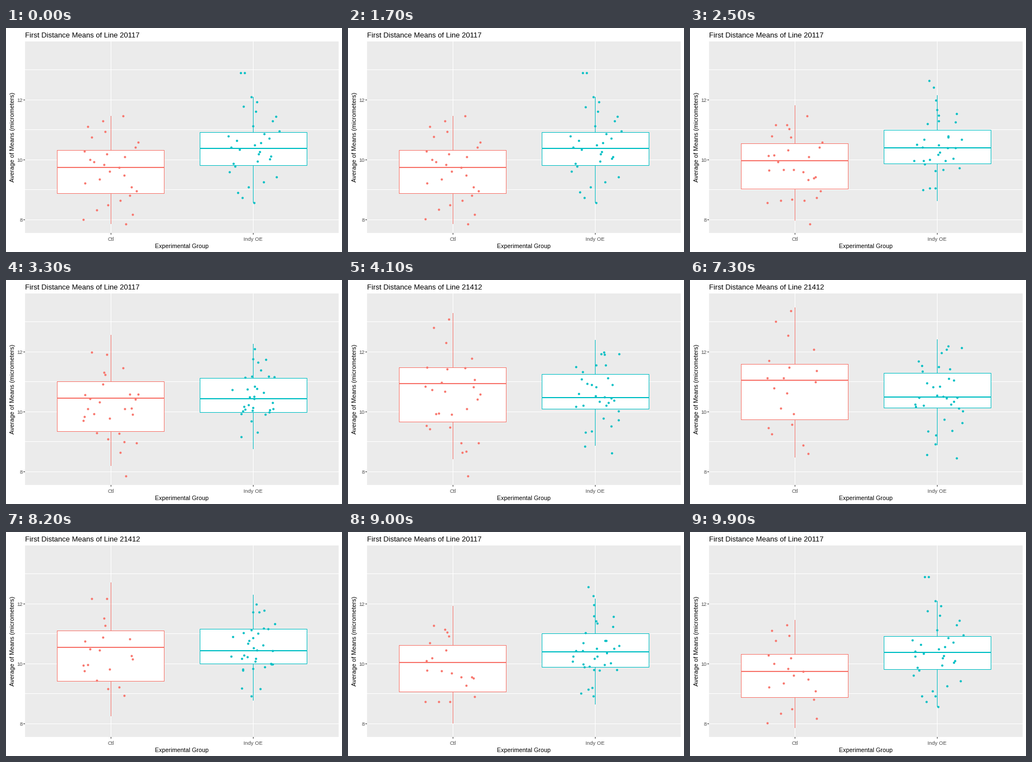
A matplotlib script for the animation above (10000 ms loop, 600x400 px).

```python
import numpy as np
import matplotlib.pyplot as plt
from matplotlib.animation import FuncAnimation
from matplotlib.patches import Rectangle

W, H, DPI = 600, 400, 100
FRAMES, INTERVAL = 100, 100
SALMON, TEAL, GREY = "#F8766D", "#00BFC4", "#4D4D4D"
LEAVE, ARRIVE, RETURN = 16, 50, 67
BOX_W = 192

rng = np.random.default_rng(20117)
# one jitter sequence serves both groups in turn, in each state
jitter = rng.permutation(np.linspace(-49, 49, 59))

plt.rcParams["font.family"] = "Liberation Sans"
fig = plt.figure(figsize=(W / DPI, H / DPI), dpi=DPI, facecolor="white")
ax = fig.add_axes([0, 0, 1, 1])
ax.set(xlim=(0, W), ylim=(H, 0))
ax.axis("off")


def bar(x, y, w, h, color, z=1):
    return ax.add_patch(Rectangle((x, y), w, h, fc=color, lw=0, zorder=z))


def label(x, y, text, px, color="black", **kw):
    kw.setdefault("va", "baseline")
    return ax.text(x, y, text, fontsize=px * 72 / DPI, color=color, **kw)


def mix(a, b, p):
    return np.rint(a + (b - a) * p)


def cloud(center, start, levels, n, outliers=()):
    """Jittered points whose quartiles follow the box levels."""
    y = np.interp(np.linspace(0, 4, n), range(5), levels)
    y = rng.permutation(np.append(y, outliers))
    return np.column_stack([center + jitter[start:start + len(y)], y])


class BoxPlot:
    """Box, whiskers and points; levels run from top whisker to bottom whisker."""

    def __init__(self, left, center, color, levels, clouds):
        self.left, self.center = left, center
        self.levels = np.array(levels)
        self.clouds = clouds
        self.whisker = bar(center, 0, 1, 1, color, 3)
        self.edge = bar(left, 0, BOX_W, 1, color, 4)
        self.fill = bar(left + 1, 0, BOX_W - 2, 1, "white", 5)
        self.median = bar(left, 0, BOX_W, 2, color, 6)
        self.dots = ax.scatter([], [], s=(4 * 72 / DPI) ** 2, c=color,
                               linewidths=0, antialiaseds=False, zorder=7)

    def update(self, p, state):
        top, q3, mid, q1, bottom = mix(*self.levels, p)
        self.whisker.set_bounds(self.center, top, 1, bottom - top)
        self.edge.set_bounds(self.left, q3, BOX_W, q1 - q3 + 1)
        self.fill.set_bounds(self.left + 1, q3 + 1, BOX_W - 2, q1 - q3 - 1)
        self.median.set_y(mid - 1)
        # points without a partner stay put while their state is current
        a, b = self.clouds
        n = min(len(a), len(b))
        self.dots.set_offsets(np.vstack([mix(a[:n], b[:n], p),
                                         self.clouds[state][n:]]))


# panel, grid and axes
bar(34, 24, 560, 342, "#EBEBEB", 0)
for y in (74, 128, 181, 235, 288, 342):
    bar(34, y, 560, 1, "white")
for y, text in ((128, "12"), (235, "10"), (342, "8")):
    bar(31, y, 3, 1, "#333333")
    label(29.5, y + 4, text, 9.4, GREY, ha="right")
for x, text in ((187, "Ctl"), (441, "Indy OE")):
    bar(x, 24, 1, 342, "white")
    bar(x, 366, 1, 3, "#333333")
    label(x + 0.5, 380, text, 9.4, GREY, ha="center")
label(314, 393, "Experimental Group", 10.6, ha="center")
label(17.5, 195, "Average of Means (micrometers)", 11, rotation=90,
      ha="right", va="center")
title = label(34, 17, "", 13)

ctl_levels = (157, 218, 249, 295, 350), (40, 144, 173, 245, 314)
indy_levels = (123, 186, 215, 245, 312), (104, 164, 209, 227, 293)
ctl = BoxPlot(91, 187, SALMON, ctl_levels, (
    cloud(187, 0, ctl_levels[0], 27),
    cloud(187, 0, ctl_levels[1], 19)))
indy = BoxPlot(346, 441, TEAL, indy_levels, (
    cloud(441, 27, indy_levels[0], 30, (80, 80)),
    cloud(441, 19, indy_levels[1], 32, (327, 327))))


def progress(k):
    if k < ARRIVE:
        t = max(0, k - LEAVE) / (ARRIVE - LEAVE)
    else:
        t = 1 - max(0, k - RETURN) / (FRAMES - RETURN)
    return (1 - np.cos(np.pi * t)) / 2


def update(k):
    p = progress(k)
    state = int(k >= ARRIVE)
    ctl.update(p, state)
    indy.update(p, state)
    line = 21412 if p > 0.5 + 1e-9 else 20117
    title.set_text(f"First Distance Means of Line {line}")
    return []


anim = FuncAnimation(fig, update, frames=FRAMES, interval=INTERVAL,
                     repeat=True, repeat_delay=0, blit=False)
plt.show()
```
